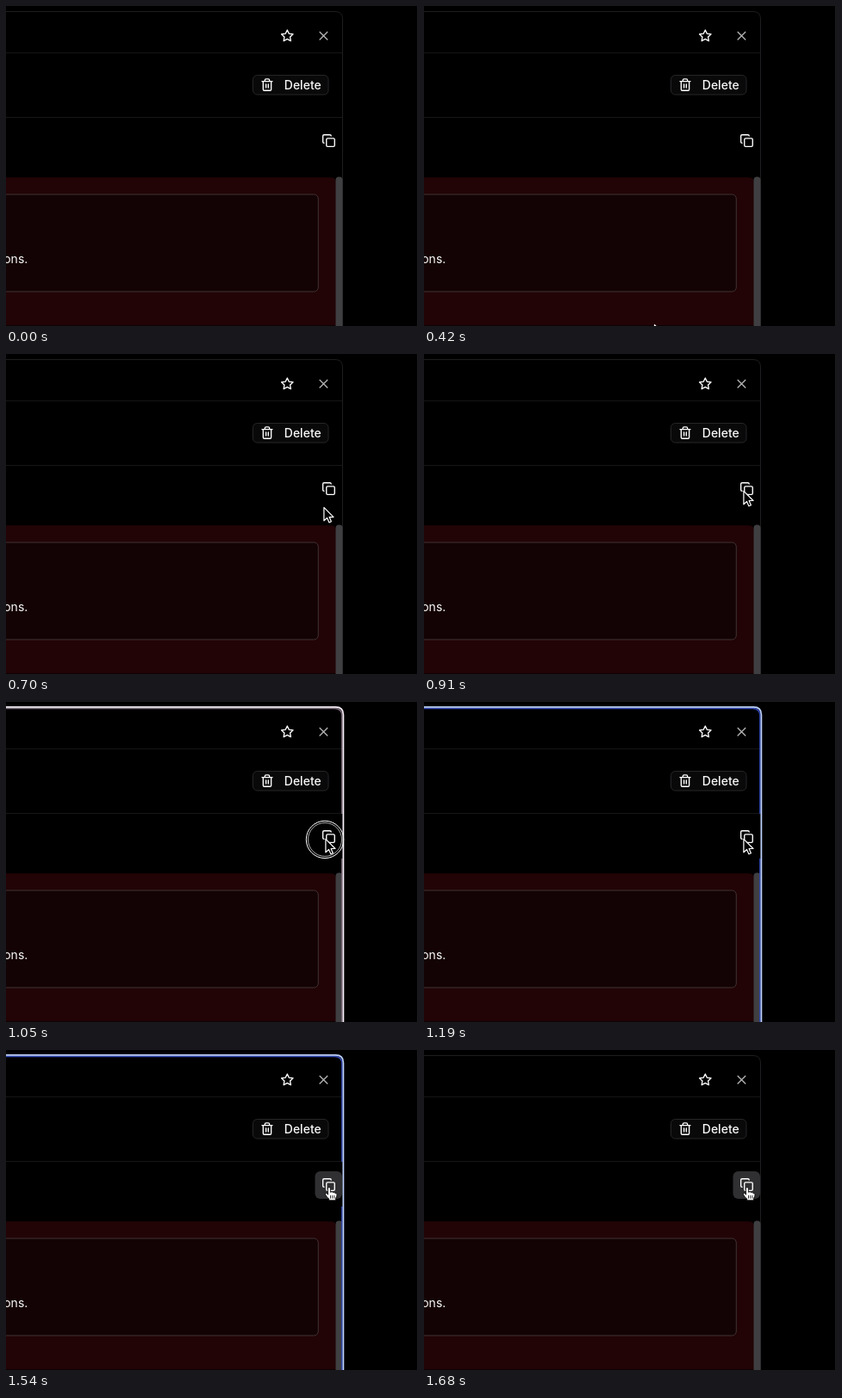
These frames come from a looping animation (478x372 px, 1.96 s). An HTML page:

```html
<!DOCTYPE html>
<html lang="en">
<head>
<meta charset="utf-8">
<title>Copy button</title>
<style>
  html, body { margin: 0; width: 100%; height: 100%; overflow: hidden; background: #000; }
  svg { display: block; width: 478px; height: 372px; }
  text { font-family: Inter, sans-serif; font-size: 14px; fill: #fafafa; }
  .icon { fill: none; stroke: #fff; stroke-width: 2; stroke-linecap: round; stroke-linejoin: round; }
  .rule { fill: none; stroke: #161617; }
  .frame { fill: none; stroke: #1d1d1f; }
</style>
</head>
<body>
<svg viewBox="0 0 478 372">
  <rect width="478" height="372" fill="#000"/>
  <path class="frame" d="M477.5 0V372"/>
  <path class="frame" d="M0 6.5H382Q390.5 6.5 390.5 15V372"/>
  <path class="rule" d="M0 54.5H390M0 129.5H390"/>

  <!-- Alert area -->
  <path d="M0 199.2H377Q383 199.2 383 205.2V372H0Z" fill="#220406"/>
  <rect x="-12" y="219" width="374.3" height="113" rx="5" fill="#140304" stroke="#403233"/>
  <path d="M0 371.5H383" stroke="#0e0203"/>
  <text x="25.3" y="298.5" text-anchor="end">ons.</text>
  <path d="M382.5 372V202.5Q382.5 198.5 386.5 198.5T390.5 202.5V372Z" fill="#3f3f41"/>

  <!-- Focus outline -->
  <g id="focus" fill="none">
    <path id="inner" d="M0 7.4H381Q389.8 7.4 389.8 16V130M389.8 182V372" stroke-width="1.5"/>
    <path id="outer" d="M0 5.8H382.500Q391.400 5.800 391.400 14.700V372" stroke-width="1.700"/>
  </g>

  <rect id="hover" x="358.5" y="141" width="31.5" height="32" rx="6" fill="#303032"/>

  <!-- Header icons -->
  <path class="icon" transform="translate(318.3 26.6) scale(.667)"
    d="M12 2l3.090 6.260L22 9.270l-5 4.870 1.180 6.880L12 17.770l-6.180 3.250L7 14.140 2 9.270l6.910-1.010z"/>
  <path class="icon" transform="translate(359.7 25.8) scale(.73)" style="stroke:#b4b4b6;stroke-width:1.8" d="M6 6L18 18M18 6L6 18"/>

  <!-- Delete button -->
  <rect x="286.5" y="80.5" width="87.5" height="22.5" rx="5" fill="#09090a" stroke="#262628"/>
  <path class="icon" transform="translate(295 83.6) scale(.667)"
    d="M3 6H21M19 6V20Q19 22 17 22H7Q5 22 5 20V6M8 6V4Q8 2 10 2H14Q16 2 16 4V6M10 11V17M14 11V17"/>
  <text x="322.8" y="96.6" font-weight="500">Delete</text>

  <path class="icon" transform="translate(366.3 148.4) scale(.68)"
    d="M10 8H20Q22 8 22 10V20Q22 22 20 22H10Q8 22 8 20V10Q8 8 10 8ZM4 16Q2 16 2 14V4Q2 2 4 2H14Q16 2 16 4"/>

  <g id="ring" fill="none" stroke="#fff">
    <circle id="ringOut" stroke-width="1"/>
    <circle id="ringIn" stroke-width=".9" stroke-opacity=".75"/>
  </g>

  <path id="arrow" d="M.5 0V15.5L4.1 12.2L6.5 17.5L9 16.4L6.7 11.2H11.6Z"
    fill="#000" stroke="#fff" stroke-width="1.2" stroke-linejoin="round"/>
  <g id="hand" stroke="#000" stroke-width=".8" stroke-linejoin="round" stroke-linecap="round">
    <path fill="#fff" d="M-1.6 1.7Q-1.6 .2 -.1 .2T1.4 1.7V6Q3.7 4.7 4.2 6.3Q6.3 5.3 6.7 7.1Q9 6.6 9 8.8Q9 11.2 7.5 13V15.5H-.3V13.8Q-3 11.5 -4.5 8.8Q-5 7.2 -3.4 7.1Q-2.3 7.4 -1.6 8.6Z"/>
    <path fill="none" d="M1.5 10V13M3.7 10V13M5.9 10V13"/>
  </g>
</svg>
<script>
const LOOP = 1960, STEP = 70;
const el = id => document.getElementById(id);
const set = (id, attrs) => {
  for (const key in attrs) el(id).setAttribute(key, attrs[key]);
};
const show = (id, on) => set(id, { visibility: on ? "visible" : "hidden" });
const span = (t, a, b) => Math.min(1, Math.max(0, (t - a) / (b - a)));
const mix = (a, b, k) => a + (b - a) * k;
const tint = (a, b, k) => `rgb(${a.map((v, i) => Math.round(mix(v, b[i], k)))})`;
const easeOut = (u, power) => 1 - Math.pow(1 - u, power);

function pointer(t) {
  const u = span(t, 420, 910);
  return {
    x: mix(267, 370.4, easeOut(u, 4.66)) + 4.6 * span(t, 1190, 1400),
    y: mix(370.6, 159.3, easeOut(u, 2.84))
  };
}

function drawRing(t, x, y) {
  const second = t >= 1610;
  const on = t >= 980 && t < 1120 || second && t < 1680;
  const r = second ? 31 : mix(13, 21.7, span(t, 980, 1050));
  show("ring", on);
  set("ring", { opacity: second ? .4 : 1 });
  set("ringOut", { cx: x, cy: y, r });
  set("ringIn", { cx: x, cy: y, r: r - 2.2 });
}

function draw(t) {
  const { x, y } = pointer(t);
  const place = { transform: `translate(${x} ${y})` };
  const pointing = t >= 1330;
  set("arrow", place);
  set("hand", place);
  show("arrow", t >= 420 && !pointing);
  show("hand", pointing);
  set("hover", { opacity: span(t, 1260, 1470) });

  const blue = span(t, 1050, 1190);
  set("outer", { stroke: tint([246, 238, 247], [188, 208, 250], blue) });
  set("inner", { stroke: tint([120, 104, 120], [48, 72, 180], blue) });
  set("focus", { opacity: span(t, 910, 1050) - span(t, 1540, 1680) });
  show("focus", t >= 980 && t < 1680);
  drawRing(t, x - .4, y + .6);
}

let start;
function tick(now) {
  start ??= now;
  draw(Math.floor((now - start) % LOOP / STEP) * STEP);
  requestAnimationFrame(tick);
}
draw(0);
requestAnimationFrame(tick);
</script>
</body>
</html>
```
